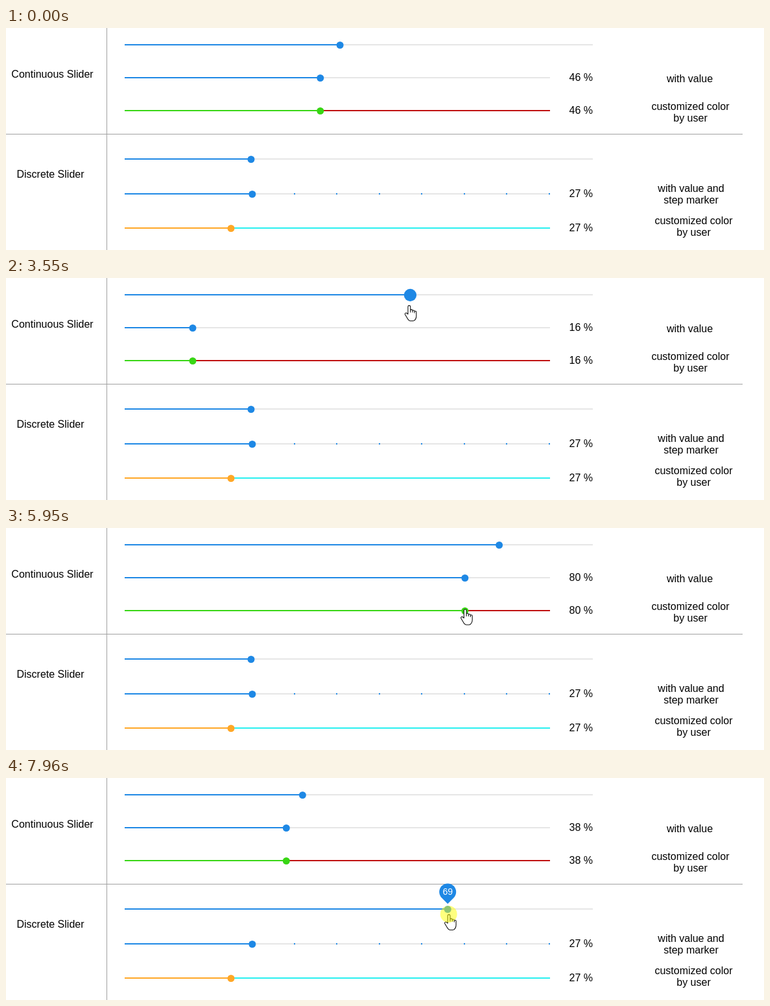
Write an HTML page that moves like this. It is 1169x344 px and loops after 8000 ms.

```html
<!DOCTYPE html>
<html lang="en">
<head>
<meta charset="utf-8">
<title>Sliders</title>
<style>
  html, body { margin: 0; width: 100%; height: 100%; overflow: hidden; background: #fff; }
  svg { display: block; width: 1169px; height: 344px; }
  text { font: 16px "Liberation Sans", Arial, sans-serif; }
  .mid { text-anchor: middle; }
  .tip { font-size: 14px; fill: #fff; }
</style>
</head>
<body>
<svg viewBox="0 0 1169 344">
  <path d="M155.5 0V344M0 164.5H1136" stroke="#a0a0a0"/>
  <g class="mid">
    <text x="71.5" y="77">Continuous Slider</text>
    <text x="68.5" y="232">Discrete Slider</text>
    <text x="1054.5" y="84">with value</text>
    <text x="1055.5" y="127">customized color</text>
    <text x="1055.5" y="145">by user</text>
    <text x="1056.5" y="254">with value and</text>
    <text x="1056.5" y="272">step marker</text>
    <text x="1060.5" y="304">customized color</text>
    <text x="1060.5" y="322">by user</text>
  </g>
  <g id="sliders"></g>
  <g id="bubble">
    <path d="M-9.2 9.2A13 13 0 1 1 9.2 9.2L0 18.4Z" fill="#1e88e5"/>
    <text id="tip" class="mid tip" y="4.5"></text>
  </g>
  <path id="hand" fill="#fff" stroke="#111" stroke-width="1.1" stroke-linejoin="round"
    d="M-1.5 14V2.5a1.9 1.9 0 0 1 3.8 0V11V8.5a1.6 1.6 0 0 1 3.3 0V11V9.5a1.5 1.5 0 0 1 3 0V12V10.7a1.4 1.4 0 0 1 2.8 0V17C11.4 20 9.5 24.5 6.5 24.5H2.5C0 24.5-2 21.5-3 19.5L-6 14.5C-6.8 12.5-4.5 11.5-3.3 12.5Z"/>
  <circle id="halo" r="13" fill="#ff0" fill-opacity=".5"/>
</svg>
<script>
const LOOP = 8000, STEP = 76, ENTER = 70, LEFT = 183;
const BLUE = '#1e88e5', GREY = '#e6e6e6';
const $ = id => document.getElementById(id);

// Continuous sliders share one value, passed on after each release.
const sliders = [
  { y: 26, width: 722, value: 46, shared: true },
  { y: 77, width: 656, value: 46, shared: true, label: 46 },
  { y: 128, width: 656, value: 46, shared: true, label: 46, color: '#38d614', rail: '#c01010' },
  { y: 203, width: 722, value: 27 },
  { y: 257, width: 656, value: 30, label: 27, marks: 10 },
  { y: 310, width: 656, value: 25, label: 27, color: '#ffa726', rail: '#28f0f0' }
];
const pinned = sliders[3];

// slip: where the pointer ends up relative to the dragged thumb
const gestures = [
  { row: 0, press: 1150, release: 2000, to: 16, slip: [4, -5] },
  { row: 0, press: 2860, release: 3550, to: 61, slip: [-2, 16] },
  { row: 1, press: 4710, release: 5250, to: 80, slip: [-1, 7] },
  { row: 2, press: 6190, release: 6650, to: 38, slip: [2, 5] },
  { row: 3, press: 7270, release: LOOP, to: 69, slip: [1.5, 8] }
];

const thumbX = (s, value) => LEFT + s.width * value / 100;
const mix = (a, b, k) => a + (b - a) * k;
const mixPoint = (a, b, k) => a.map((v, i) => mix(v, b[i], k));
const between = (t, a, b) => t >= a && t < b;
const smooth = p => p * p * (3 - 2 * p);
const easeOut = p => 1 - (1 - p) ** 1.5;
const swing = p => 1 - (1 - p) * Math.cos(1.5 * Math.PI * p);

// Progress from start to end, advancing in hard steps
function progress(t, start, end, lag = 0) {
  const elapsed = Math.floor((t - start) / STEP + 0.03) * STEP - lag;
  return Math.min(1, Math.max(0, elapsed / (end - start)));
}

// Work out where each gesture starts and ends
let pointer = [722, 80], free = ENTER, current = 46, lastRow;
for (const g of gestures) {
  const s = sliders[g.row];
  g.value = s.shared ? current : s.value;
  g.from = pointer;
  g.leave = free;
  g.travel = free === ENTER ? swing : smooth;
  g.grab = g.row === lastRow ? pointer : [thumbX(s, g.value), s.y];
  g.drop = [thumbX(s, g.to) + g.slip[0], s.y + g.slip[1]];
  g.arrive = g.release - 2.5 * STEP;
  g.sync = g.release + STEP;
  pointer = g.drop;
  free = g.sync;
  current = g.to;
  lastRow = g.row;
}

function add(tag, attrs) {
  const el = document.createElementNS('http://www.w3.org/2000/svg', tag);
  for (const key in attrs) el.setAttribute(key, attrs[key]);
  return $('sliders').appendChild(el);
}

for (const s of sliders) {
  const { y, width, color = BLUE, rail = GREY, marks = 0 } = s;
  const bar = (x, w, fill) => add('rect', { x, y: y - 1, width: w, height: 2, fill });
  bar(LEFT, width, rail);
  for (let k = 1; k <= marks; k++) bar(Math.floor(LEFT + (width - 1) * k / marks) - 1, 2, color);
  s.fill = bar(LEFT, 0, color);
  s.thumb = add('circle', { cy: y + 0.5, fill: color });
  if (s.label) s.text = add('text', { x: 868.5, y: y + 5 });
}

function place(el, [x, y], shown) {
  el.setAttribute('transform', `translate(${x} ${y})`);
  el.style.display = shown ? '' : 'none';
}

function sliderState(s, row, t) {
  let { value, label } = s, big = false;
  for (const g of gestures) {
    if (g.row === row && t >= g.press) {
      value = mix(g.value, g.to, easeOut(progress(t, g.press, g.arrive, STEP / 2)));
      big = s !== pinned && t < g.sync;
    }
    if (s.shared && sliders[g.row].shared && t >= g.sync) value = label = g.to;
  }
  return { value, label, big };
}

function pointerAt(t) {
  const g = gestures.findLast(g => t >= g.leave) || gestures[0];
  if (t >= g.press) return mixPoint(g.grab, g.drop, easeOut(progress(t, g.press, g.arrive)));
  return mixPoint(g.from, g.grab, g.travel(progress(t, g.leave, g.press - 2 * STEP)));
}

function draw(t) {
  sliders.forEach((s, row) => {
    let { value, label, big } = sliderState(s, row, t);
    if (s === pinned) {
      value = Math.round(value);
      $('tip').textContent = value;
      place($('bubble'), [thumbX(s, value), 176.5], t >= gestures.at(-1).press);
    }
    const x = thumbX(s, value);
    s.fill.setAttribute('width', x - LEFT);
    s.thumb.setAttribute('cx', x);
    s.thumb.setAttribute('r', big ? 9.7 : 5.5);
    if (s.text) s.text.textContent = `${label} %`;
  });
  const point = pointerAt(t);
  place($('hand'), point, t >= ENTER);
  place($('halo'), point, gestures.some(g => between(t, g.press, g.release)));
}

const began = performance.now();
function tick() {
  draw((performance.now() - began) % LOOP);
  requestAnimationFrame(tick);
}
tick();
</script>
</body>
</html>
```
